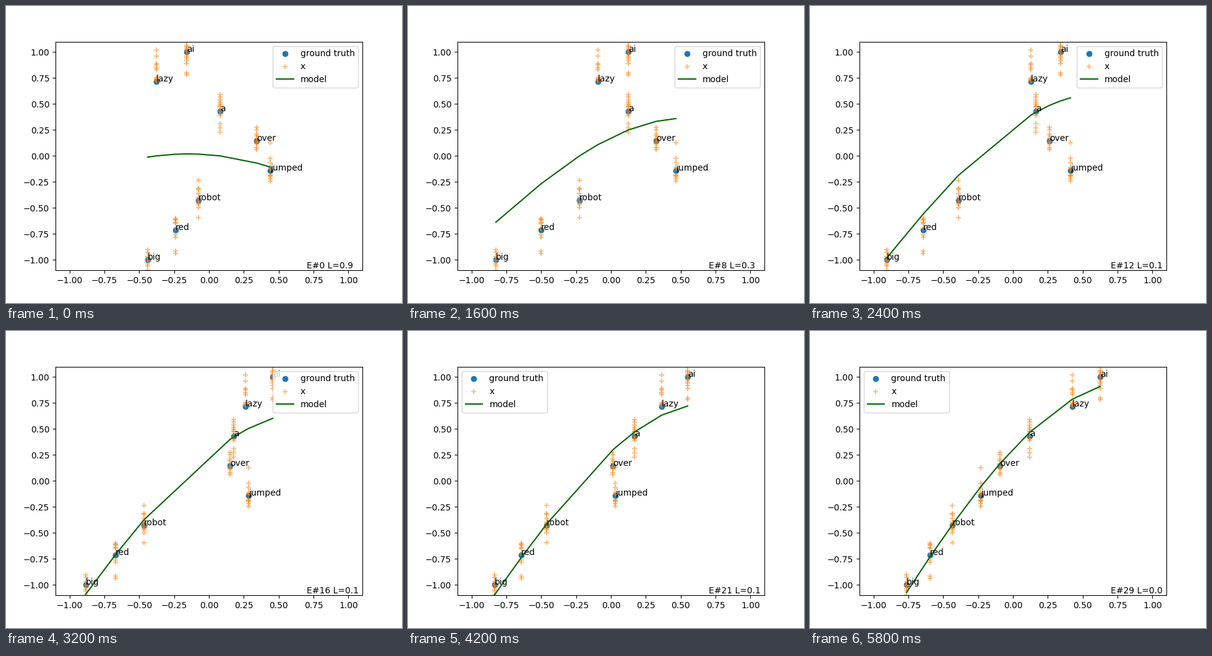
Animation of 640 by 480 pixels, one loop 8000 ms. Source, as a matplotlib script:

```python
import numpy as np
import matplotlib.pyplot as plt
from matplotlib.animation import FuncAnimation

STEP_MS = 200
FRAMES = 40
LAST_EPOCH = 29

WORDS = ["big", "red", "robot", "jumped", "over", "a", "lazy", "ai"]
TARGETS = np.linspace(-1, 1, len(WORDS))

# Noisy samples scattered around each word's target
SAMPLES = [
    [-.9, -.925, -.97, -1.0, -1.01, -1.04, -1.055, -1.1],
    [-.6, -.61, -.615, -.64, -.645, -.7, -.76, -.785, -.915, -.94],
    [-.235, -.315, -.32, -.36, -.395, -.42, -.44, -.455, -.465, -.5, -.59],
    [.125, -.02, -.065, -.11, -.13, -.18, -.19, -.195, -.22, -.24],
    [.275, .25, .21, .19, .17, .14, .125, .115, .08, .06],
    [.59, .565, .54, .515, .495, .48, .475, .43, .41, .39, .31, .27, .23],
    [1.02, .96, .89, .875, .85, .83, .75, .74, .73, .72],
    [1.1, 1.06, 1.05, 1.03, 1.01, .98, .96, .94, .92, .89, .8, .78],
]

EPOCHS = np.array([0, 4, 8, 12, 16, 21, 29])

# Embedding of every word at the key epochs
EMBED = np.array([
    [-.440, -.240, -.076, .440, .342, .080, -.377, -.160],
    [-.582, -.310, -.098, .457, .328, .075, -.288, -.089],
    [-.825, -.501, -.226, .466, .324, .124, -.093, .124],
    [-.905, -.643, -.390, .412, .262, .164, .129, .341],
    [-.883, -.670, -.466, .284, .151, .177, .262, .457],
    [-.834, -.643, -.461, .031, .013, .168, .364, .550],
    [-.763, -.594, -.435, -.231, -.093, .120, .426, .625],
])

# Model output at four inputs; a cubic runs through them
MODEL_X = [-.8, -.4, 0, .4]
MODEL_Y = np.array([
    [-.134, -.003, .012, -.090],
    [-.262, -.049, .075, .081],
    [-.607, -.163, .176, .351],
    [-.808, -.199, .279, .555],
    [-.938, -.272, .251, .576],
    [-1.03, -.310, .282, .656],
    [-1.15, -.356, .306, .766],
])

LOSS = np.array([.9, .43, .27, .14, .10, .07, .03])


def spline(keys, epoch):
    """Cubic Hermite interpolation of the key rows."""
    slopes = np.gradient(keys, EPOCHS, axis=0, edge_order=2)
    i = min(np.searchsorted(EPOCHS, epoch, side="right") - 1, len(EPOCHS) - 2)
    h = EPOCHS[i + 1] - EPOCHS[i]
    t = (epoch - EPOCHS[i]) / h
    return ((1 + 2 * t) * (1 - t) ** 2 * keys[i]
            + t * (1 - t) ** 2 * h * slopes[i]
            + t * t * (3 - 2 * t) * keys[i + 1]
            + t * t * (t - 1) * h * slopes[i + 1])


fig, ax = plt.subplots(figsize=(6.4, 4.8), dpi=100)


def draw(frame):
    epoch = min(frame, LAST_EPOCH)
    xs = spline(EMBED, epoch)
    cubic = np.polyfit(MODEL_X, spline(MODEL_Y, epoch), 3)
    loss = np.interp(epoch, EPOCHS, LOSS)

    ax.clear()
    ax.set_xlim(-1.1, 1.1)
    ax.set_ylim(-1.1, 1.1)
    ax.scatter(xs, TARGETS, label="ground truth")
    ax.scatter(np.repeat(xs, [len(s) for s in SAMPLES]),
               np.concatenate(SAMPLES), marker="+", alpha=0.5, label="x")
    line_x = np.sort(xs)
    ax.plot(line_x, np.polyval(cubic, line_x), color="darkgreen", label="model")
    for word, x, y in zip(WORDS, xs, TARGETS):
        ax.text(x, y, word)
    ax.text(0.7, -1.08, f"E#{epoch} L={loss:.1f}")
    ax.legend(loc="upper right" if epoch < 17 else "upper left")
    return []


anim = FuncAnimation(fig, draw, frames=FRAMES, interval=STEP_MS,
                     repeat=True, repeat_delay=0)
plt.show()
```
